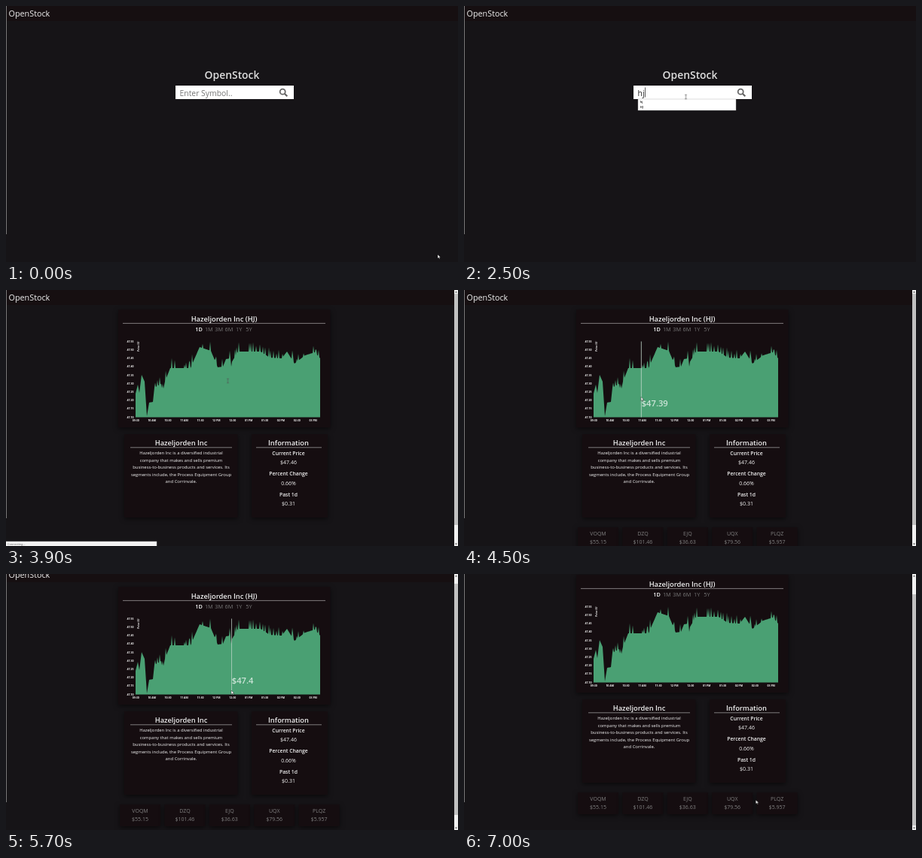
These frames come from a looping animation (600 px wide and 341 px high, 7.1 s). An HTML page:

```html
<!DOCTYPE html>
<html lang="en">
<head>
<meta charset="utf-8">
<title>OpenStock</title>
<style>
html, body { margin: 0; width: 100%; height: 100%; overflow: hidden; background: #161417; }
svg { display: block; width: 600px; height: 341px; font-family: "Open Sans", "Noto Sans", sans-serif; fill: #f2f2f2; }
.mid { text-anchor: middle; }
.head { font-size: 9.3px; font-weight: 600; }
.label { font-size: 6.8px; font-weight: 600; }
.value { font-size: 7px; }
.about { font-size: 5.9px; }
.range { font-size: 7.3px; fill: #777; }
.range .on { fill: #fff; font-weight: 600; }
.axis { font-size: 3.5px; font-weight: 700; }
.peer { font-size: 7px; fill: #808080; }
.field { font-size: 10.4px; fill: #222; }
.item { font-size: 3.5px; font-weight: 700; fill: #222; }
.card { fill: #150d10; filter: drop-shadow(0 2px 3px rgba(0, 0, 0, .55)); }
.rule { stroke: #9a9798; stroke-width: .8; }

/* Hard switches, all on one 7.1 s loop */
.sw { animation: 7.1s step-end infinite; }
.home { animation-name: home; }
.result { animation-name: result; }
.hint { animation-name: hint; }
.caret { animation-name: caret; }
.caret2 { animation-name: caret2; }
.all { animation-name: all; }
.few { animation-name: few; }
.key1 { animation-name: key1; }
.key2 { animation-name: key2; }
.status { animation-name: status; }
.peers { animation-name: peers; }
.cross { animation-name: cross; }
.beam { animation-name: beam; }
.arrow { animation-name: arrow; }
@keyframes home { 0% { opacity: 1 } 53.52%, to { opacity: 0 } }
@keyframes result { 0% { opacity: 0 } 53.52%, to { opacity: 1 } }
@keyframes hint { 0% { opacity: 1 } 32.39%, to { opacity: 0 } }
@keyframes caret { 0%, 19.71%, 32.39%, to { opacity: 0 } 12.67%, 26.76% { opacity: 1 } }
@keyframes caret2 { 0%, 40.84%, to { opacity: 0 } 33.8% { opacity: 1 } }
@keyframes all { 0%, 32.39%, to { opacity: 0 } 12.67% { opacity: 1 } }
@keyframes few { 0%, 46.47%, to { opacity: 0 } 32.39% { opacity: 1 } }
@keyframes key1 { 0% { opacity: 0 } 32.39%, to { opacity: 1 } }
@keyframes key2 { 0% { opacity: 0 } 33.8%, to { opacity: 1 } }
@keyframes status { 0%, 60.56%, to { opacity: 0 } 46.47% { opacity: 1 } }
@keyframes peers { 0% { opacity: 0 } 60.56%, to { opacity: 1 } }
@keyframes cross { 0%, 83.09%, to { opacity: 0 } 56.33% { opacity: 1 } }
@keyframes beam { 0%, 56.33%, to { opacity: 0 } 9.85% { opacity: 1 } }
@keyframes arrow { 0%, 56.33%, to { opacity: 1 } 9.85% { opacity: 0 } }

.scroll { animation: scroll 7.1s infinite; }
.page { --d: -25px; }
.thumb { --d: 22px; }
@keyframes scroll {
  0% { transform: none; animation-timing-function: step-end }
  76.05% { transform: translateY(0); animation-timing-function: steps(4, start) }
  81.69% { transform: translateY(calc(var(--d) * .36)); animation-timing-function: steps(4, start) }
  87.32%, to { transform: translateY(var(--d)) }
}
</style>
</head>
<body>
<svg viewBox="0 0 600 341">
  <defs>
    <g id="nav">
      <rect width="600" height="20" fill="#160f11"/>
      <text x="3.5" y="14" font-size="10.8">OpenStock</text>
    </g>
  </defs>

  <g class="sw home">
    <use href="#nav"/>
    <text class="mid" x="300" y="96.7" font-size="13.9" font-weight="600" fill="#dedede">OpenStock</text>
    <rect x="225" y="106" width="157" height="18" fill="#fff"/>
    <g fill="none" stroke="#666" stroke-width="1.8">
      <circle cx="367.2" cy="114.2" r="3.5"/>
      <path d="M369.8 116.8L373.3 120.3" stroke-width="2.2"/>
    </g>
    <g class="field">
      <text class="sw hint" x="230.5" y="119.5" fill="#757575">Enter Symbol..</text>
      <text class="sw key1" x="230.5" y="119.5">h</text>
      <text class="sw key2" x="237" y="119.5">j</text>
    </g>
    <rect class="sw caret" x="231" y="108.5" width=".8" height="13" fill="#333"/>
    <rect class="sw caret2" x="240" y="108.5" width=".8" height="13" fill="#333"/>
    <g class="sw all" id="all"></g>
    <g class="sw few" id="few"></g>
  </g>

  <g class="sw result">
    <g class="scroll page">
      <use href="#nav"/>
      <rect class="card" x="149" y="26" width="281.5" height="157"/>
      <rect class="card" x="157" y="192" width="150.5" height="111"/>
      <rect class="card" x="326" y="192" width="101" height="111"/>
      <path class="rule" d="M155 44.4H424M165 209.8H300M332 209.8H419"/>

      <g class="mid">
        <text class="head" x="289.5" y="41.6">Hazeljorden Inc (HJ)</text>
        <g class="range" id="ranges"></g>
        <text class="head" x="232.5" y="207.2">Hazeljorden Inc</text>
        <g class="about" id="about"></g>
        <text class="head" x="375" y="207.2">Information</text>
        <g id="info"></g>
      </g>

      <path id="area" fill="#4aa073"/>
      <g class="axis" id="axis">
        <text transform="translate(176.6 82) rotate(-90)" font-style="italic">Price ($)</text>
      </g>
      <g class="sw cross">
        <g id="cross">
          <path d="M.4 68.5V169.5" stroke="#c4d9cd" stroke-width=".8"/>
          <text id="price" x=".8" y="155" font-size="11.2" font-weight="600" fill="#fff" fill-opacity=".72"></text>
        </g>
      </g>
      <g class="sw peers mid" id="peers"></g>
    </g>

    <rect x="595" width="5" height="341" fill="#f1f1f1"/>
    <rect class="scroll thumb" x="595" y="5" width="5" height="308" fill="#c1c1c1"/>
    <path d="M596 3.5L597.5 1.5L599 3.5zM596 337.5L597.5 339.5L599 337.5z" fill="#555"/>
  </g>

  <g class="sw status">
    <rect x="-1" y="335" width="201" height="7" fill="#f3f3f3" stroke="#bbb" stroke-width=".5"/>
    <text x="2" y="339.8" font-size="3.9" fill="#666">Connecting...</text>
  </g>
  <rect width="1" height="304" fill="#777"/>

  <g id="pointer">
    <path class="sw arrow" d="M0 0V5.2L1.3 4.1L2.2 6L3.1 5.6L2.3 3.8H3.9z" fill="#fff" stroke="#000" stroke-width=".4"/>
    <path class="sw beam" d="M-1.2 -2.8H1.2M0 -2.8V2.8M-1.2 2.8H1.2" fill="none" stroke="#555" stroke-width=".7"/>
  </g>
</svg>

<script>
const LOOP = 7100, STEP = 100;
const LEFT = 172, RIGHT = 417, TOP = 68.5, BASE = 169.5, ROW = 11.22;
const $ = id => document.getElementById(id);

function add(parent, tag, attrs, text = '') {
  const el = document.createElementNS('http://www.w3.org/2000/svg', tag);
  for (const key in attrs) el.setAttribute(key, attrs[key]);
  el.textContent = text;
  return parent.appendChild(el);
}
const label = (parent, x, y, text, cls = '') => add(parent, 'text', { x, y, class: cls }, text);

// Linear interpolation over key points [at, ...values]
function along(keys, at) {
  const n = keys.findIndex(k => k[0] > at);
  if (n < 0) return keys.at(-1).slice(1);
  const [a, b] = [keys[n - 1], keys[n]], k = (at - a[0]) / (b[0] - a[0]);
  return a.slice(1).map((v, i) => v + (b[i + 1] - v) * k);
}

// Search box
function suggest(box, words) {
  add(box, 'rect', { x: 231, y: 124, width: 130, height: words.length * 7.5, fill: '#fff', stroke: '#aaa', 'stroke-width': .4 });
  words.forEach((w, i) => label(box, 234, 128.9 + i * 7.45, w, 'item'));
}
suggest($('all'), ['hj', 'zopl', 'mvrt', 'oa', 'a', 'why']);
suggest($('few'), ['hj', 'HJ']);

// Cards
['1D', '1M', '3M', '6M', '1Y', '5Y'].forEach((r, i) =>
  label($('ranges'), 256 + i * 13.3, 54.8, r, i ? '' : 'on'));
['Hazeljorden Inc is a diversified industrial', 'company that makes and sells premium',
 'business-to-business products and services. Its', 'segments include, the Process Equipment Group',
 'and Corrinvale.'].forEach((line, i) => label($('about'), 232.5, 219.3 + i * 9.5, line));
[['Current Price', '$47.46'], ['Percent Change', '0.66%'], ['Past 1d', '$0.31']].forEach(([name, value], i) => {
  label($('info'), 375, 219.9 + i * 27.5, name, 'label');
  label($('info'), 375, 232.4 + i * 27.5, value, 'value');
});
[['VOQM', '$55.15'], ['DZQ', '$101.46'], ['EJQ', '$36.63'], ['UQX', '$79.56'], ['PLQZ', '$5.957']].forEach(([name, value], i) => {
  const x = 178 + i * 59.4;
  add($('peers'), 'rect', { x: x - 27, y: 316, width: 54, height: 29, class: 'card' });
  label($('peers'), x, 326.6, name, 'peer');
  label($('peers'), x, 337.7, value, 'peer');
});

// Chart: a trend through key points, with seeded narrow spikes on top
const trend = [
  [172, 138], [175, 126], [177, 137], [180, 113], [184, 122], [187, 168], [190, 150], [195, 149],
  [197, 130], [206, 125], [208, 136], [211, 122], [218, 104], [245, 104], [250, 92], [257, 76],
  [272, 81], [281, 103], [288, 102], [292, 92], [298, 91], [299, 102], [300, 95.4], [308, 82],
  [338, 82], [350, 90], [366, 91], [373, 82], [383, 98], [397, 87], [410, 83], [417, 91]];
let seed = 11;
const random = () => (seed = seed * 16807 % 2147483647) / 2147483647;
let outline = `M${LEFT} ${BASE}`;
for (let x = LEFT; x <= RIGHT; x++) {
  const spike = random() < .2 && x > 197 ? 4 + random() * 10 : 0;
  outline += `L${x} ${Math.max(TOP, along(trend, x)[0] - spike)}`;
}
$('area').setAttribute('d', outline + `V${BASE}z`);

for (let i = 0; i < 10; i++) label($('axis'), 160.5, TOP + 1.2 + i * ROW, (47.55 - i * .05).toFixed(2));
for (let i = 0; i < 12; i++) {
  const hour = Math.floor(9.5 + i / 2);
  const hh = String(hour > 12 ? hour - 12 : hour).padStart(2, '0');
  label($('axis'), LEFT + .3 + i * 21.4, 175.2, hh + (i % 2 ? hour < 12 ? ' AM' : ' PM' : ':30'), 'mid');
}
const priceAt = x => +(47.55 - (along(trend, x)[0] - TOP) / ROW * .05).toFixed(2);

// Pointer: time, x, y
const path = [
  [0, 573, 331], [600, 297, 99], [700, 294.5, 121], [3900, 294.5, 121], [4600, 225, 146],
  [5000, 300, 154.5], [5200, 300, 154.5], [5400, 299, 155], [5700, 299, 155],
  [6100, 288, 190], [6700, 372, 306], [6900, 387.3, 301]];

let start;
function draw(now) {
  start ??= now;
  const t = Math.floor((now - start) % LOOP / STEP) * STEP;
  const [x, y] = along(path, t);
  $('pointer').setAttribute('transform', `translate(${x} ${y})`);
  $('cross').setAttribute('transform', `translate(${x} 0)`);
  $('price').textContent = '$' + priceAt(x);
  requestAnimationFrame(draw);
}
requestAnimationFrame(draw);
</script>
</body>
</html>
```
